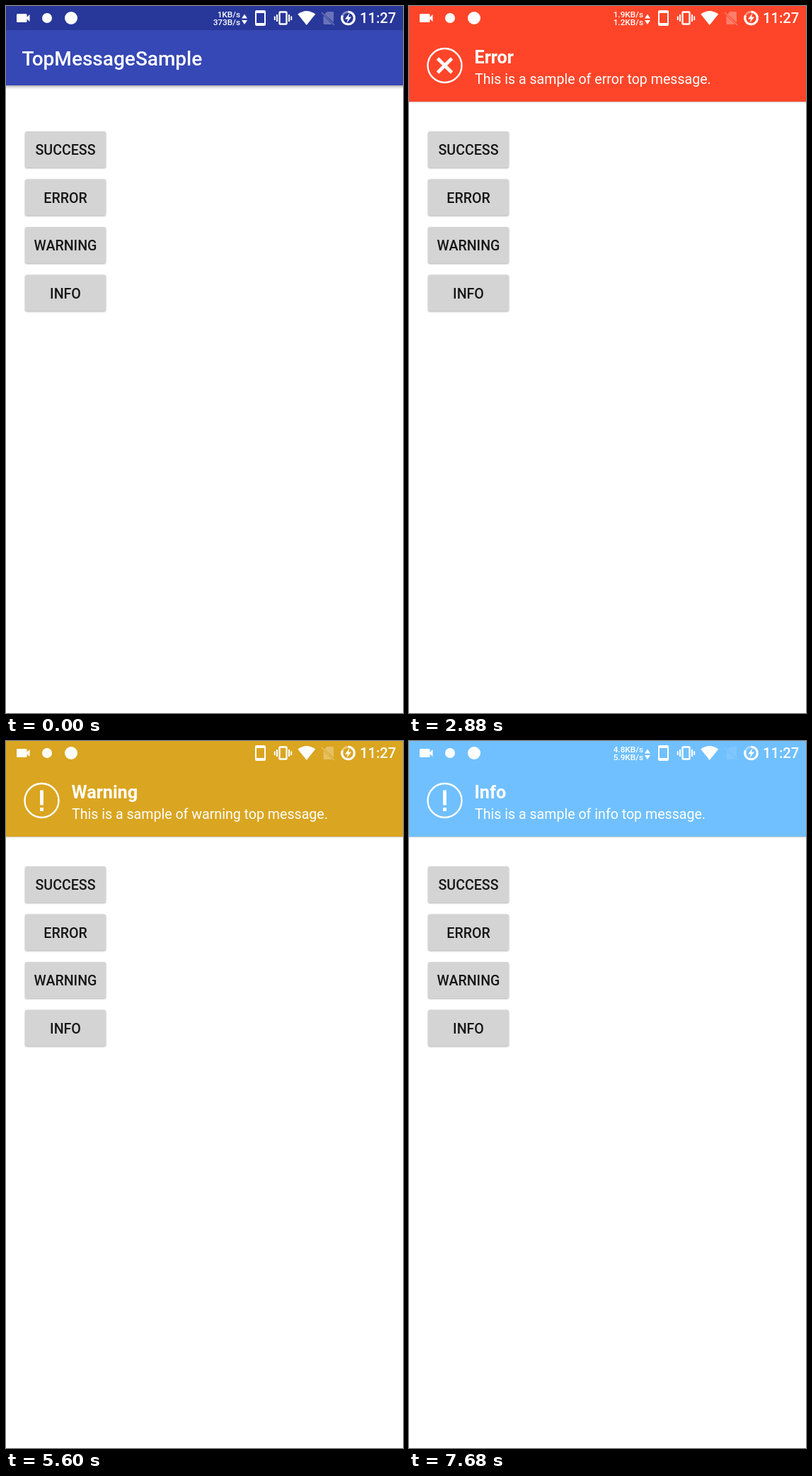
An HTML page for the animation above (8 s loop, 561 by 998 pixels).

```html
<!DOCTYPE html>
<html lang="en">
<head>
<meta charset="utf-8">
<title>Top message</title>
<style>
  html, body { margin: 0; width: 100%; height: 100%; overflow: hidden; background: #fff; }
  svg { display: block; width: 561px; height: 998px; font-family: Roboto, sans-serif; }
  .button { fill: #d4d4d4; filter: drop-shadow(0 1.5px 1.2px rgba(0,0,0,.32)); }
  .label { font-size: 19.6px; font-weight: 500; text-anchor: middle; fill: #161616; }
  .bar { filter: drop-shadow(0 2.5px 2px rgba(0,0,0,.35)); }
  .line { fill: none; stroke: #fff; }
  .net { font-size: 11.8px; font-weight: 500; text-anchor: end; }
</style>
</head>
<body>
<svg viewBox="0 0 561 998">
  <rect class="bar" x="-10" y="-10" width="581" height="122" fill="#3648b5"/>
  <rect width="561" height="34" fill="#28379a"/>
  <text x="22.5" y="84" font-size="28" font-weight="500" fill="#fff">TopMessageSample</text>
  <g id="buttons"></g>
  <g id="panel">
    <rect id="sheet" width="561" height="135"/>
    <rect y="135" width="561" height="1.2" opacity=".18"/>
    <g id="content" fill="#fff">
      <circle class="line" cx="50.5" cy="84" r="24" stroke-width="2.4"/>
      <path id="mark" class="line" stroke-width="4.8"/>
      <text id="heading" x="92.5" y="80.5" font-size="25.2" font-weight="700"></text>
      <text id="body" x="93" y="109.5" font-size="19.6"></text>
    </g>
  </g>
  <g fill="#fff">
    <rect x="15" y="11" width="14.5" height="12" rx="1.5"/>
    <path d="M28 17L33.500 12V22Z"/>
    <circle cx="58" cy="17" r="7"/>
    <circle cx="92" cy="17" r="9"/>
    <g id="net">
      <text id="up" class="net" x="331" y="16"></text>
      <text id="down" class="net" x="331" y="27"></text>
      <path d="M333 17.500H341L337 11.500ZM333 20H341L337 26Z"/>
    </g>
    <path fill-rule="evenodd" d="M354 6H365Q367 6 367 8V26Q367 28 365 28H354Q352 28 352 26V8Q352 6 354 6ZM354 10V24H365V10Z"/>
    <rect class="line" x="386.500" y="8.500" width="10" height="17" rx="1" stroke-width="2.4"/>
    <path class="line" stroke-width="2" d="M383 12V22M379.800 14.500V20M400 12V22M403.200 14.500V20"/>
    <path d="M424.700 27L412.300 11.500Q424.700 2.500 437.200 11.500Z"/>
    <g id="sim">
      <path d="M454 8H461.500Q463 8 463 9.500V23L450 11.500ZM448.500 13.500L461 26H450Q448.500 26 448.500 24.500Z"/>
      <path class="line" stroke-width="1.5" d="M446 9L464 27"/>
    </g>
    <circle class="line" cx="483.500" cy="17" r="8.800" stroke-width="3" opacity=".4"/>
    <path class="line" stroke-width="3" d="M483.500 8.200A8.800 8.800 0 1 1 475.500 13.300"/>
    <path d="M485.500 10L479 18.500H483L481.500 24L488 15.500H484Z"/>
    <text x="500" y="24" font-size="20.2" font-weight="500">11:27</text>
  </g>
  <circle id="pointer" r="13.500" fill="#f4f6f8" fill-opacity=".82" stroke="#9aa8b8" stroke-width="1.3"/>
</svg>
<script>
const LOOP = 8000, STEP = 80, SLIDE = 260, HEIGHT = 135;
const BANG = 'M50.500 69.500V90.500M50.500 94V99';

// touch, show and hide are times in ms; x, y is where the finger lands
const messages = [
  { name: 'Success', color: '#4f8a10', mark: 'M38 84L47 93L64 75', touch: 480, show: 839, hide: 1663, x: 112, y: 215 },
  { name: 'Error', color: '#ff4529', mark: 'M40.500 74L60.500 94M60.500 74L40.500 94', touch: 1720, show: 2020, hide: 3320, x: 110, y: 286.5 },
  { name: 'Warning', color: '#daa520', mark: BANG, touch: 3920, show: 4157, hide: 5950, x: 115, y: 347 },
  { name: 'Info', color: '#70c0ff', mark: BANG, touch: 6480, show: 6840, hide: Infinity, x: 112, y: 414 }
];
const speeds = [
  [0, '1KB/s', '373B/s'], [720, '559B/s', '256B/s'], [1600],
  [2480, '1.9KB/s', '1.2KB/s'], [3520], [7040, '4.8KB/s', '5.9KB/s']
];

const $ = id => document.getElementById(id);
const clamp = v => Math.min(1, Math.max(0, v));
const ease = v => (1 - Math.cos(Math.PI * clamp(v))) / 2;

$('buttons').innerHTML = messages.map(({ name }, i) => `
  <g transform="translate(0 ${67.5 * i})">
    <rect class="button" x="27" y="177" width="114" height="51" rx="2.500"/>
    <rect class="ripple" x="27" y="177" width="114" height="51" rx="2.500"/>
    <text class="label" x="84" y="210">${name.toUpperCase()}</text>
  </g>`).join('');
const ripples = document.querySelectorAll('.ripple');

function drawPanel(t) {
  const msg = messages.find(m => t >= m.show && t < m.hide + SLIDE);
  $('panel').style.display = msg ? '' : 'none';
  $('sim').style.opacity = msg && msg.name === 'Info' ? 0.1 : 0.3;
  if (!msg) return;
  const p = ease((t - msg.show) / SLIDE) - ease((t - msg.hide) / SLIDE);
  $('panel').setAttribute('transform', `translate(0 ${HEIGHT * (p - 1)})`);
  $('panel').style.opacity = 1 - 0.3 * (1 - p) ** 1.4;
  $('content').style.opacity = 0.6 + 0.4 * p;
  $('sheet').setAttribute('fill', msg.color);
  $('mark').setAttribute('d', msg.mark);
  $('heading').textContent = msg.name;
  $('body').textContent = `This is a sample of ${msg.name.toLowerCase()} top message.`;
}

function drawTouch(t) {
  const msg = messages.find(m => t >= m.touch && t < m.show);
  $('pointer').style.display = msg ? '' : 'none';
  if (msg) $('pointer').setAttribute('transform', `translate(${msg.x} ${msg.y})`);
  messages.forEach((m, i) => {
    const age = t - m.touch;
    ripples[i].style.opacity = 0.1 * clamp((age - 150) / 150) * clamp((1000 - age) / 450);
  });
}

function drawSpeed(t) {
  const [, up, down] = speeds.filter(s => s[0] <= t).pop();
  $('net').style.display = up ? '' : 'none';
  $('up').textContent = up || '';
  $('down').textContent = down || '';
}

function frame(now) {
  const t = Math.floor((now % LOOP) / STEP) * STEP;
  drawPanel(t);
  drawTouch(t);
  drawSpeed(t);
  requestAnimationFrame(frame);
}
requestAnimationFrame(frame);
</script>
</body>
</html>
```
